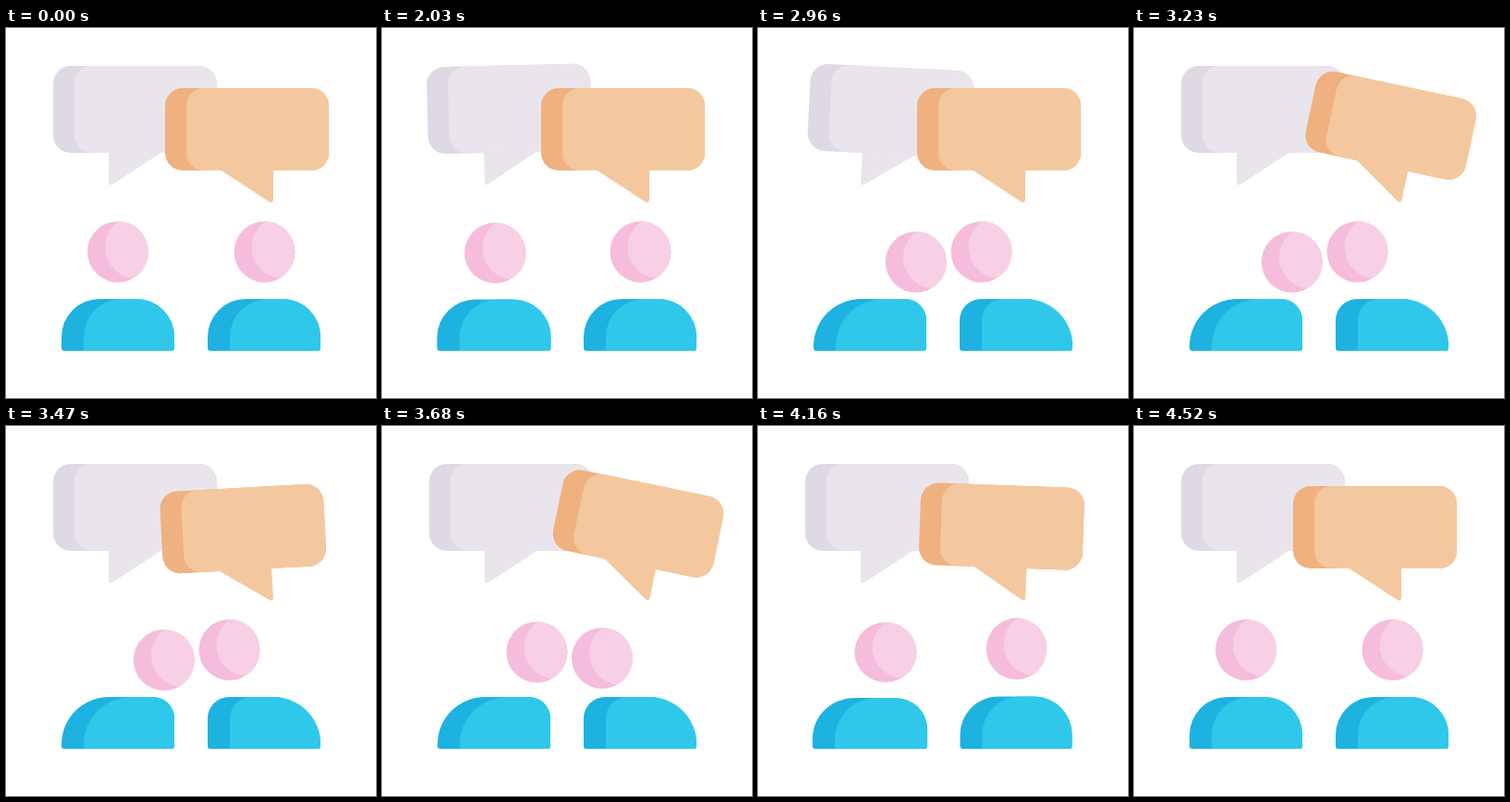
These frames come from a looping animation (400x400 px, 4550 ms). An HTML page with a canvas:

```html
<!DOCTYPE html>
<html lang="en">
<head>
<meta charset="utf-8">
<title>Conversation</title>
<style>
  html, body { margin: 0; width: 100%; height: 100%; overflow: hidden; background: #fff; }
  canvas { display: block; width: 400px; height: 400px; }
</style>
</head>
<body>
<canvas id="stage" width="400" height="400"></canvas>
<script>
const ctx = document.getElementById('stage').getContext('2d');
const LOOP = 4550, START = 2030, STEP = 30, MOVE = 290;

const bubbles = [
  { x: 51, y: 41, h: 94, side: 1, tailX: 111, dark: '#dfd9e3', light: '#eae5ec',
    start: 1995, beat: 225, peaks: [-21.5, 10.4, -9.3, 3.6] },
  { x: 172, y: 65, h: 89, side: -1, tailX: 289, dark: '#efb180', light: '#f4c89e',
    start: 3080, beat: 215, peaks: [15.5, -5, 13.8, -5.5, 2.1] }
];

const people = [
  { home: 121, near: 166.5, left: 60, side: 1, go: 2000, back: 3990, nodFrom: 2560, nodTo: 3480 },
  { home: 279.5, near: 241.5, left: 218, side: -1, go: 2110, back: 3837, nodFrom: 3470, nodTo: 3850 }
];

const mix = (a, b, u) => a + (b - a) * u;
const smooth = u => { u = Math.min(1, Math.max(0, u)); return u * u * (3 - 2 * u); };

// Eases from 0 to 1 at one time and back to 0 at another.
const pulse = (t, from, to) => smooth((t - from) / MOVE) - smooth((t - to) / MOVE);

// Eases from rest through evenly spaced peaks and back to rest.
function swing(t, { start, beat, peaks }) {
  const u = (t - start) / beat, i = Math.floor(u);
  return mix(peaks[i - 1] || 0, peaks[i] || 0, smooth(u - i));
}

// Squash, then a smaller stretch, over the course of one hop.
function squashAt(dt) {
  const u = dt / 400;
  return u > 0 && u < 1 ? 0.27 * Math.sin(2 * Math.PI * u) * u * (1 - u) ** 2 : 0;
}

function at(x, y, draw, scaleX = 1, scaleY = 1, degrees = 0) {
  ctx.save();
  ctx.translate(x, y);
  ctx.rotate(degrees * Math.PI / 180);
  ctx.scale(scaleX, scaleY);
  draw();
  ctx.restore();
}

function box(color, x, y, w, h, radii) {
  ctx.fillStyle = color;
  ctx.beginPath();
  ctx.roundRect(x, y, w, h, radii);
  ctx.fill();
}

function disc(color, x, y, r) {
  ctx.fillStyle = color;
  ctx.beginPath();
  ctx.arc(x, y, r, 0, 2 * Math.PI);
  ctx.fill();
}

function drawBubble(bubble, t) {
  const { x, y, h, side, tailX, dark, light } = bubble;
  const pivotX = tailX + side, pivotY = y + h + 34;
  at(pivotX, pivotY, () => {
    const left = x - pivotX;
    box(dark, left, -h - 34, 177, h, 19);
    box(light, left + 23, -h - 34, 154, h, 19);
    ctx.beginPath();
    ctx.moveTo(-side, -35);
    ctx.arcTo(-side, 2.7, 55.5 * side, -34, 2.5);
    ctx.lineTo(55.5 * side, -34);
    ctx.lineTo(55.5 * side, -35);
    ctx.fill();
  }, 1, 1, swing(t, bubble));
}

function drawPerson({ home, near, left, side, go, back, nodFrom, nodTo }, t) {
  const squash = squashAt(t - go) + squashAt(t - back);
  const closeness = pulse(t, go, back), nod = pulse(t, nodFrom, nodTo);
  const headX = mix(home, near, closeness) + 4.3 * side * nod;
  const headY = 242 + 150 * squash + 11 * nod;

  at(headX, headY, () => {
    disc('#f5bcdb', 0, 0, 33);
    ctx.clip();
    disc('#f8d0e6', 19.5, -5, 33.5);
  }, 1 + squash, 1 - squash);

  const inner = mix(41, 23, closeness), outer = mix(41, 51, closeness);
  const [topLeft, topRight] = side > 0 ? [outer, inner] : [inner, outer];
  at(left + 61, 349, () => {
    box('#1db2e0', -61, -56, 122, 56, [topLeft, topRight, 3, 3]);
    box('#2fc8ea', -37, -56, 98, 56, [topLeft, topRight, 3, 0]);
  }, 1 + squash, 1 - squash);
}

function frame() {
  const now = performance.now() % LOOP;
  const t = now < START ? 0 : START + STEP * Math.floor((now - START) / STEP);
  ctx.clearRect(0, 0, 400, 400);
  bubbles.forEach(bubble => drawBubble(bubble, t));
  people.forEach(person => drawPerson(person, t));
  requestAnimationFrame(frame);
}
frame();
</script>
</body>
</html>
```
